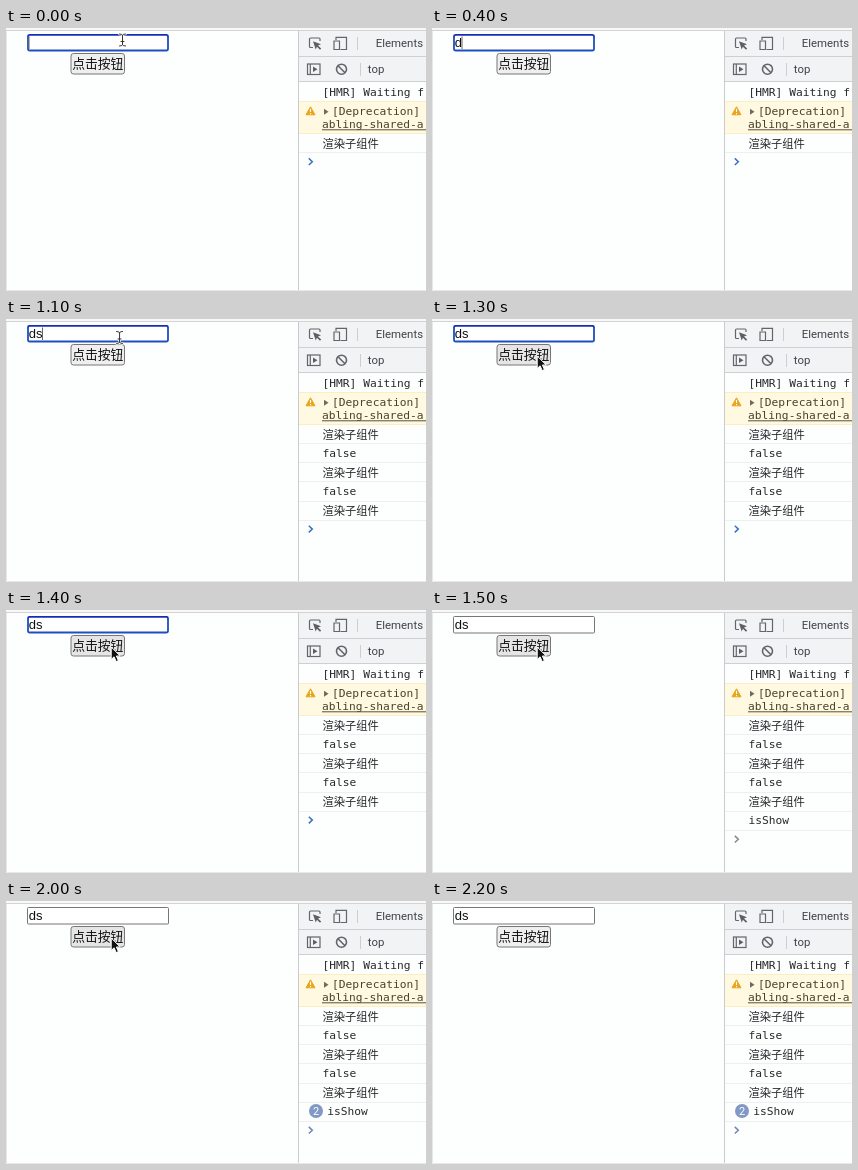
Write an HTML page that moves like this. It is 420x263 px and loops after 2.3 s.

```html
<!DOCTYPE html>
<html lang="zh">
<head>
<meta charset="utf-8">
<title>Console demo</title>
<style>
html, body { margin: 0; width: 100%; height: 100%; overflow: hidden; background: #fdfefe; }
svg { display: block; width: 420px; height: 263px; }
text { white-space: pre; }
.mono { font: 11.25px "DejaVu Sans Mono", "Noto Sans CJK SC", "Noto Sans CJK", monospace; fill: #26282b; }
.cjk { font: 11.3px "Noto Sans CJK SC", "Noto Sans CJK", sans-serif; fill: #26282b; }
.ui { font: 11.4px Roboto, sans-serif; fill: #404347; }
.field { font: 13px "Liberation Sans", Arial, sans-serif; fill: #111; }
.label { font: 12.8px "Noto Sans CJK SC", "Noto Sans CJK", sans-serif; fill: #111; }
.icon { fill: none; stroke: #62666a; stroke-width: 1.2; }
.bold { stroke-width: 1.6; }
.warn { fill: #49402a; }
</style>
</head>
<body>
<svg viewBox="0 0 420 263" xmlns="http://www.w3.org/2000/svg">
  <defs>
    <linearGradient id="blue" gradientUnits="userSpaceOnUse" x1="0" y1="6" x2="0" y2="24">
      <stop offset="0" stop-color="#1626b4"/>
      <stop offset=".25" stop-color="#1d4fc0"/>
      <stop offset="1" stop-color="#1d4fc0"/>
    </linearGradient>
  </defs>
  <rect width="420" height="263" fill="#fdfefe"/>
  <rect width="420" height="2" fill="#f8f8f8"/>
  <rect y="2" width="420" height="1" fill="#d3d3d3"/>
  <path d="M.5 3V262.500H420" fill="none" stroke="#e9e8e9"/>

  <!-- page -->
  <rect id="plain" x="21.500" y="6.500" width="141" height="16.500" rx="1" fill="#fff" stroke="#777"/>
  <rect id="ring" x="22" y="6.800" width="140" height="15.700" rx="1.800" fill="#fff" stroke="url(#blue)" stroke-width="1.800"/>
  <text id="typed" class="field" x="22.700" y="19.300"></text>
  <rect id="caret" y="8.500" width="1" height="12.500" fill="#666"/>
  <rect id="button" x="65" y="25.500" width="53.500" height="20.500" rx="2.500" stroke="#777"/>
  <text class="label" x="66.200" y="40.100">点击按钮</text>

  <!-- developer panel -->
  <rect x="292" y="3" width="128" height="51" fill="#f2f3f4"/>
  <path d="M292 28.500H420M292 53.500H420" stroke="#cdcfd2"/>
  <path d="M292.500 3V262" stroke="#c9cbce"/>
  <path d="M351.500 9V22M354.500 35V48" stroke="#cccfd2"/>
  <path class="icon" d="M307 19.500H304.500Q303.500 19.500 303.500 18.500V11Q303.500 10 304.500 10H313Q314 10 314 11V13"/>
  <path d="M307 13.300L315 16.300L312 17.500L315.200 20.600L314 21.800L310.900 18.700L309.700 21.400Z" fill="#5c6064"/>
  <path class="icon" d="M330 12V9.300H340.500V21.500H334.500M328 13H333.500V21.500H328Z"/>
  <text class="ui" x="369.800" y="19.300">Elements</text>
  <rect class="icon" x="301.500" y="36" width="12.500" height="10.500"/>
  <path class="icon" d="M304.300 36V46.500"/>
  <path d="M307 38.500L311.500 41.300L307 44Z" fill="#5c6064"/>
  <circle class="icon bold" cx="335.500" cy="41.200" r="5"/>
  <path class="icon bold" d="M332 37.700L339 44.700"/>
  <text class="ui" x="361.800" y="45">top</text>

  <text class="mono" x="316.500" y="68.200">[HMR] Waiting f</text>
  <rect x="293" y="73.500" width="127" height="31.500" fill="#fff9e1"/>
  <path d="M293 73.500H420M293 105.500H420" stroke="#fbefc2"/>
  <path d="M304.500 78.800L309 86.800H300Z" fill="#e7a51c" stroke="#e7a51c" stroke-linejoin="round"/>
  <path d="M304.500 80.800V84M304.500 85.100V86.300" stroke="#fff" stroke-width="1.100"/>
  <path d="M318 80.800L322.500 83.800L318 86.800Z" fill="#6d6a60"/>
  <text class="mono warn" x="326" y="86.900">[Deprecation]</text>
  <text class="mono warn" x="316" y="100">abling-shared-a</text>
  <path d="M316 101.800H420" stroke="#57503c"/>

  <g id="logs"></g>
  <g id="badge">
    <circle cx="310" cy="210" r="7" fill="#8199c4"/>
    <text x="310" y="213.900" text-anchor="middle" font-family="Roboto, sans-serif" font-size="11" fill="#fff">2</text>
  </g>
  <path id="prompt" d="M302.800 -3.300L306.300 0L302.800 3.300" fill="none" stroke-width="1.500"/>

  <g id="beam" fill="none" stroke-linecap="round">
    <path d="M-3 -6Q0 -6 0 -4.500Q0 -6 3 -6M0 -4.500V4.500M-3 6Q0 6 0 4.500Q0 6 3 6M-1.500 1.500H1.500" stroke="#fff" stroke-width="2.400"/>
    <path d="M-3 -6Q0 -6 0 -4.500Q0 -6 3 -6M0 -4.500V4.500M-3 6Q0 6 0 4.500Q0 6 3 6M-1.500 1.500H1.500" stroke="#333"/>
  </g>
  <path id="arrow" d="M0 0V12.500L2.900 9.800L5 14.600L7.200 13.600L5.200 9H9Z" fill="#111" stroke="#fff" stroke-width="1" stroke-linejoin="round"/>
</svg>
<script>
const $ = id => document.getElementById(id);
const LOOP = 2300, ROW = 19.1, TOP = 115.2;
const lines = ['渲染子组件', 'false', '渲染子组件', 'false', '渲染子组件', 'isShow'];

const make = (name, attrs, parent) => {
  const node = document.createElementNS('http://www.w3.org/2000/svg', name);
  for (const key in attrs) node.setAttribute(key, attrs[key]);
  return parent.appendChild(node);
};
const show = (node, on) => node.setAttribute('visibility', on ? 'visible' : 'hidden');
const within = (t, from, to) => t >= from && t < to;
const place = (node, x, y) => node.setAttribute('transform', `translate(${x} ${y})`);

const rows = lines.map((line, i) => {
  const y = TOP + i * ROW;
  const row = make('g', {}, $('logs'));
  make('path', { d: `M293 ${Math.round(y + 9) + 0.5}H420`, stroke: '#efefef' }, row);
  const isCjk = line.charCodeAt(0) > 255;
  const text = make('text', { class: isCjk ? 'cjk' : 'mono', x: 316.4, y: y + (isCjk ? 4.3 : 3.7) }, row);
  text.textContent = line;
  return { row, text };
});

function draw(time) {
  const t = Math.floor(time % LOOP / 100) * 100;
  const focused = t < 1500;
  const typed = t < 400 ? '' : t < 900 ? 'd' : 'ds';
  const count = t < 500 ? 1 : t < 900 ? 3 : t < 1500 ? 5 : 6;
  const repeated = t >= 1700;

  show($('ring'), focused);
  show($('plain'), !focused);
  $('typed').textContent = typed;
  show($('caret'), t < 200 || within(t, 400, 700) || within(t, 900, 1200));
  $('caret').setAttribute('x', [22.5, 29.5, 36][typed.length]);

  rows.forEach(({ row }, i) => show(row, i < count));
  rows[5].text.setAttribute('x', repeated ? 321.2 : 316.4);
  show($('badge'), repeated);
  place($('prompt'), 0, TOP + count * ROW - 0.6);
  $('prompt').setAttribute('stroke', focused ? '#3972bd' : repeated ? '#7185b5' : '#85888c');

  // The pointer goes from the field down to the button.
  const k = Math.min(1, Math.max(0, (t - 1000) / 300));
  const ease = k * k * (3 - 2 * k);
  const x = 116.5 - 11.3 * ease, y = 12 + 25 * ease;
  show($('beam'), t < 200 || within(t, 1000, 1200));
  place($('beam'), x, y);
  show($('arrow'), within(t, 1200, 2100));
  place($('arrow'), x, y);
  $('button').setAttribute('fill', within(t, 1200, 2100) ? '#e5e5e5' : '#efefef');
}

const start = performance.now();
function tick() {
  draw(performance.now() - start);
  requestAnimationFrame(tick);
}
tick();
</script>
</body>
</html>
```
